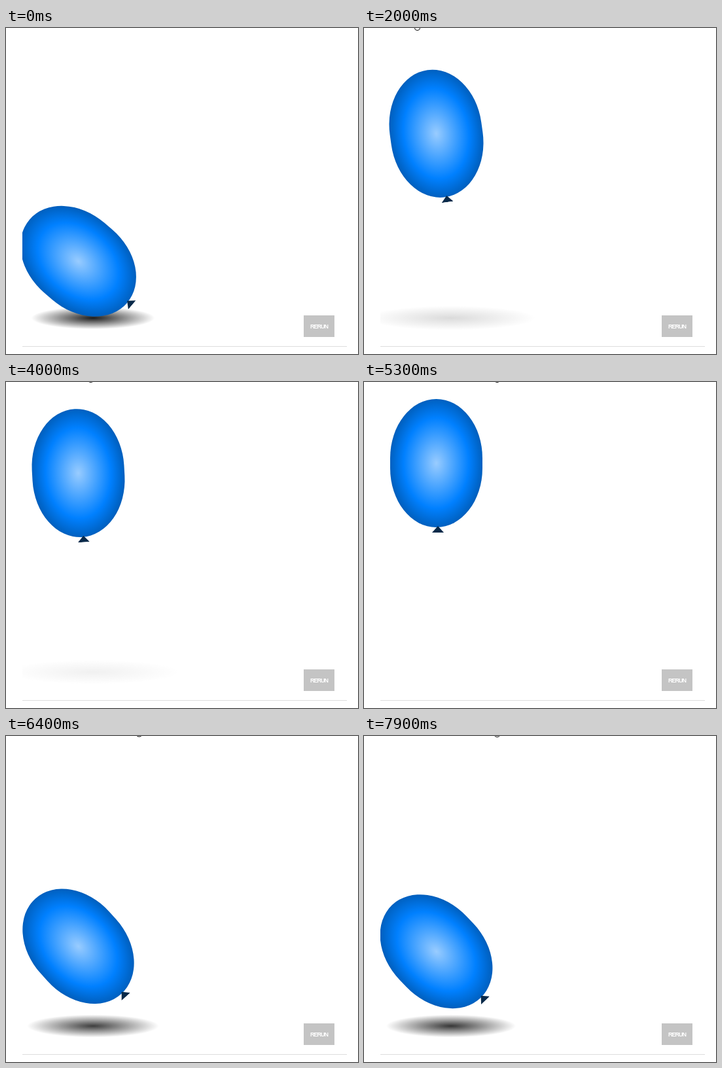
An HTML page that plays this animation: 538x498 px, repeating every 8 s.

```html
<!DOCTYPE html>
<html lang="en">
<head>
<meta charset="utf-8">
<title>Floating balloon</title>
<style>
  html, body { margin: 0; width: 538px; height: 498px; overflow: hidden; background: #fff; }
  .stage { position: absolute; left: 25px; top: 0; width: 496px; height: 486px; overflow: hidden; border-bottom: 1px solid #ddd; }
  .stage *, .cursor { position: absolute; }
  .shadow { left: 108px; top: 443px; width: 0; height: 0; }
  .shadow i { left: -100px; top: -18px; width: 200px; height: 36px; background: radial-gradient(closest-side, #000, transparent); }
  .balloon { left: 15px; top: -98px; width: 141px; height: 196px; }
  .skin { inset: 0; border-radius: 50% / 46%; background: radial-gradient(#9cf, #0080ff 50%, #036); }
  .knot { left: 64px; top: 194px; width: 18px; height: 10px; background: #0a2a4a; clip-path: polygon(50% 0, 100% 100%, 0 100%); }
  .rerun { left: 430px; top: 439px; width: 47px; height: 33px; background: #c4c4c4; color: #fff;
    font: bold 9px/34px "Liberation Sans", Arial, sans-serif; letter-spacing: -1px; text-align: center; }
  .cursor { left: -5px; top: -14px; width: 7px; height: 12px; border: 1px solid #111; border-radius: 3px 3px 4px 4px; background: #fff; }
</style>
</head>
<body>
<div class="stage">
  <div class="shadow"><i></i></div>
  <div class="balloon"><div class="skin"></div><div class="knot"></div></div>
  <div class="rerun">RERUN</div>
</div>
<div class="cursor"></div>
<script>
const LOOP = 8000, RISE_AT = 1205, HALF = 4400;
const FLOOR = 358.5, TRAVEL = 234.5, TILT = 50;
const [shadow, balloon, cursor] = ['.shadow', '.balloon', '.cursor'].map(s => document.querySelector(s));

// Accelerating run followed by rebounds: [duration, height]
const RUN = 868, REBOUNDS = [[2236, 0.1355], [340, 0.012]];
function bounce(t) {
  if (t < RUN) return (t / RUN) ** 2;
  t -= RUN;
  for (const [length, height] of REBOUNDS) {
    if (t < length) return 1 - 4 * height * (t / length) * (1 - t / length);
    t -= length;
  }
  return 1;
}

function lift(t) {
  if (t < RISE_AT) return 1 - bounce(t - RISE_AT + HALF);
  if (t < RISE_AT + HALF) return bounce(t - RISE_AT);
  return 1 - bounce(t - RISE_AT - HALF);
}

// Pointer stops: time, x, lowest y
const PATH = [[0, 82, -3], [300, 82, -3], [800, 82, 4], [2850, 82, 4], [3500, 115, 1],
  [4000, 130, 1], [4600, 204, 1], [5700, 204, 1], [7000, 204, 2], [LOOP, 204, 2]];
function pointer(t) {
  const i = PATH.findIndex(p => p[0] > t), a = PATH[i - 1], b = PATH[i];
  const k = (t - a[0]) / (b[0] - a[0]);
  return [a[1] + (b[1] - a[1]) * k, a[2] + (b[2] - a[2]) * k];
}

function draw(now) {
  const t = now % LOOP, p = lift(t), [x, y] = pointer(t);
  balloon.style.transform = `translateY(${FLOOR - TRAVEL * p}px) rotate(${-TILT * (1 - p)}deg)`;
  shadow.style.transform = `scale(${0.94 + 0.42 * p}, ${0.95 + 0.1 * p})`;
  shadow.style.opacity = 0.9 * (1 - p);
  cursor.style.transform = `translate(${x}px, ${y}px)`;
}

const start = performance.now();
function tick() {
  draw(performance.now() - start);
  requestAnimationFrame(tick);
}
tick();
</script>
</body>
</html>
```
